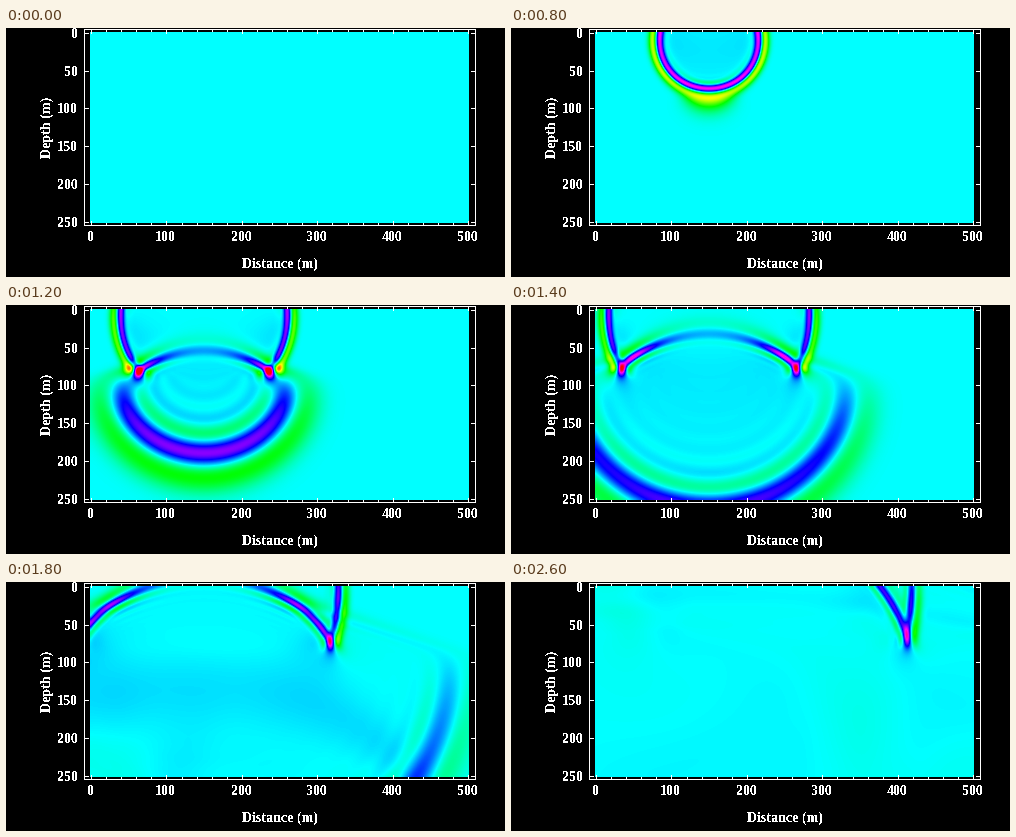
Write a matplotlib script that moves like this. It is 499 px wide and 249 px high and loops after 2.8 s.

```python
import numpy as np
import matplotlib.pyplot as plt
from matplotlib.animation import FuncAnimation
from matplotlib.colors import ListedColormap, hsv_to_rgb

plt.rcParams["font.family"] = "Liberation Serif"
plt.rcParams["font.weight"] = "bold"
plt.rcParams["text.antialiased"] = False

W, H, DPI = 499, 249, 72
FRAMES, INTERVAL = 14, 200

# Slow layer over a fast one with a smooth transition;
# lengths in metres, time in frames
DX = 2.0
NX, NZ = 251, 126
PAD = 40
STEPS = 64
V_TOP, V_BOTTOM = 22.5, 71.5
INTERFACE, BLEND = 90, 7
SRC_X, SRC_Z = 75, 5
T0, SIGMA, SKEW = 0.94, 0.22, 0.5
PEAK = 0.34


def wavelet(t):
    """Ricker pulse leaning towards a strong first lobe."""
    s = (t - T0) / SIGMA
    return -(1 - s * s + SKEW * s) * np.exp(-s * s / 2)


def edge_distance(n):
    """Cells outside the visible range, along one padded axis."""
    i = np.arange(n + 2 * PAD) - PAD
    return np.maximum(np.maximum(-i, i - n + 1), 0)


def laplacian(u):
    """Second order down, fourth order across."""
    c = u[2:-2, 2:-2]
    down = u[3:-1, 2:-2] + u[1:-3, 2:-2] - 2 * c
    across = (16 * (u[2:-2, 3:-1] + u[2:-2, 1:-3])
              - u[2:-2, 4:] - u[2:-2, :-4] - 30 * c) / 12
    return down + across


def simulate():
    shape = (NZ + 2 * PAD, NX + 2 * PAD)
    depth = (np.arange(shape[0]) - PAD) * DX
    mix = (1 + np.tanh((depth - INTERFACE) / BLEND)) / 2
    v = (V_TOP + (V_BOTTOM - V_TOP) * mix)[:, None]
    c2 = ((v / STEPS / DX) ** 2)[2:-2]
    dz, dx = edge_distance(NZ)[:, None], edge_distance(NX)[None, :]
    sponge = np.exp(-(0.008 * dz) ** 2 - (0.008 * dx) ** 2)

    u, prev = np.zeros(shape), np.zeros(shape)
    view = np.s_[PAD:PAD + NZ, PAD:PAD + NX]
    fields = [u[view].copy()]
    for n in range((FRAMES - 1) * STEPS):
        new = 2 * u - prev
        new[2:-2, 2:-2] += c2 * laplacian(u)
        new[PAD + SRC_Z, PAD + SRC_X] += wavelet(n / STEPS)
        prev, u = u * sponge, new * sponge
        if (n + 1) % STEPS == 0:
            fields.append(u[view].copy())
    scale = PEAK / -fields[4][SRC_Z].min()
    return [f * scale for f in fields]


fields = simulate()

fig = plt.figure(figsize=((W + 0.01) / DPI, (H + 0.01) / DPI), dpi=DPI,
                 facecolor="black")
ax = fig.add_axes([0, 0, 1, 1])
ax.axis("off")

# Zero is cyan; crests run to green and yellow, troughs to blue and magenta
hues = np.linspace(1, 0, 511)
cmap = ListedColormap(hsv_to_rgb(np.stack([hues, hues * 0 + 1, hues * 0 + 1], 1)))
image = ax.imshow(fields[0], cmap=cmap, vmin=-0.5, vmax=0.5, aspect="auto",
                  extent=(84, 462, 195, 5), interpolation="bicubic")
ax.set_xlim(0, W)
ax.set_ylim(H, 0)

LEFT, RIGHT, TOP, BOTTOM = 77.5, 468.5, 1.5, 197.5


def line(x0, y0, x1, y1):
    ax.plot([x0, x1], [y0, y1], color="white", lw=1, antialiased=False)


def label(x, y, s, **kw):
    ax.text(x, y, s, color="white", fontsize=14, **kw)


def px(m):
    return round(84 + 0.7545 * m) + 0.5


def pz(m):
    return round(5 + 0.755 * m) + 0.5


line(LEFT, TOP, RIGHT, TOP)
line(LEFT, BOTTOM, RIGHT, BOTTOM)
line(LEFT, TOP, LEFT, BOTTOM)
line(RIGHT, TOP, RIGHT, BOTTOM)

for m in range(0, 501, 20):
    size = 4 if m % 100 == 0 else 2
    line(px(m), TOP, px(m), TOP + size)
    line(px(m), BOTTOM, px(m), BOTTOM - size)
    if m % 100 == 0:
        label(px(m), 213, str(m), ha="center", va="baseline")

for m in range(0, 251, 50):
    line(LEFT, pz(m), LEFT + 4, pz(m))
    line(RIGHT, pz(m), RIGHT - 4, pz(m))
    label(72, pz(m) + 4.5, str(m), ha="right", va="baseline")

label(273.5, 240, "Distance (m)", ha="center", va="baseline")
label(41, 99.5, "Depth (m)", ha="center", va="center", rotation=90)


def update(i):
    image.set_data(fields[i])
    return [image]


anim = FuncAnimation(fig, update, frames=FRAMES, interval=INTERVAL,
                     repeat=True, blit=False)
plt.show()
```
